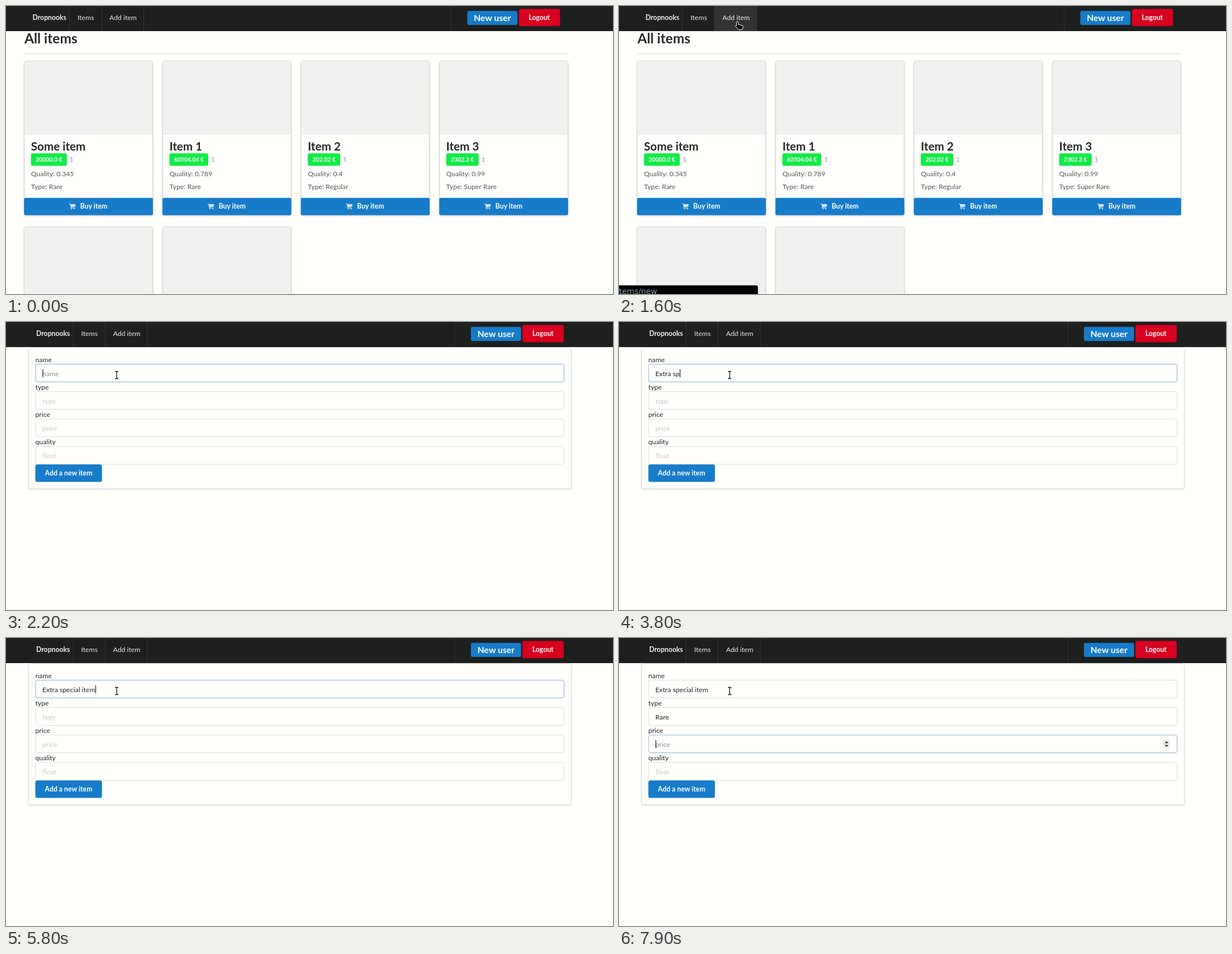
An HTML page that plays this animation: 1086 by 516 pixels, repeating every 8 s.

```html
<!DOCTYPE html>
<html lang="en">
<head>
<meta charset="utf-8">
<title>Item shop</title>
<style>
  html, body { margin: 0; width: 100%; height: 100%; overflow: hidden; background: #fffffc; }
  svg { display: block; width: 1086px; height: 516px; }
  text { font: 12.25px Lato, sans-serif; fill: #272727; white-space: pre; }
  .b { font-weight: 700; }
  .w { fill: #fff; }
  .nav { fill: #eceded; }
  .dim { fill: #555; }
  .card { filter: drop-shadow(0 1px 1.5px rgba(0, 0, 0, .2)); }
  .cursor { fill: #000; stroke: #fff; stroke-linejoin: round; }
</style>
</head>
<body>
<svg id="stage" viewBox="0 0 1086 516"></svg>
<script>
const LOOP = 8000, STEP = 100, SHIFT = 6.5;
const BLUE = '#167bc9', LINE = '#dcddda', FOCUS = '#85b1d6';
const ROW = 49.2, COL = 247.6;

const rect = (x, y, w, h, fill, r = 0, more = '') =>
  `<rect x="${x}" y="${y}" width="${w}" height="${h}" rx="${r}" fill="${fill}" ${more}/>`;
const text = (x, y, s, cls = '', more = '') =>
  `<text x="${x}" y="${y}" class="${cls}" ${more}>${s}</text>`;
const size = px => `style="font-size:${px}px"`;
const middle = 'text-anchor="middle"';

function navBar() {
  const split = x => rect(x, 0, 1, 44.5, '#343535');
  return rect(0, 0, 1086, 45, '#1e1f1f') +
    '<g id="nav">' +
    rect(171, 0, 75.5, 44.5, '#fff', 0, 'id="hover"') +
    [113, 170.5, 246, 796].map(split).join('') +
    text(47.5, 25, 'Dropnooks', 'b nav') +
    text(128, 25, 'Items', 'nav') +
    text(185, 25, 'Add item', 'nav') +
    rect(825.3, 8.7, 89.8, 25.3, BLUE, 3) +
    text(870.2, 26.5, 'New user', 'b w', `text-anchor="middle" style="font-size:15.75px"`) +
    rect(917.5, 5.3, 73.8, 31, '#d8001f', 3.5) +
    text(954.2, 25, 'Logout', 'b w', middle) + '</g>';
}

function cart(x, y) {
  return `<g transform="translate(${x} ${y})" fill="#d5e5f3">` +
    '<path d="M0 0h2.4l.5 1.4h8.6v4.4l-7.4 1 .2.8h6.2v1.1H3.2L1.7 1.1H0z"/>' +
    '<circle cx="4.2" cy="9.8" r="1"/><circle cx="9.7" cy="9.8" r="1"/></g>';
}

function card(i, y, item) {
  const frame = rect(.5, 0, 229.6, 276, '#fffffc', 3.5, 'stroke="#d2d3d0" class="card"') +
    `<path d="M1 130.5V4q0-3.5 3.5-3.5h221.6q3.5 0 3.5 3.5v126.5z" fill="#f0f1ee"/>` +
    rect(1, 130.3, 228.6, 1, '#e4e5e2');
  let body = '';
  if (item) {
    const [name, price, tag, quality, type] = item;
    body = text(12.5, 160, name, 'b', size(20.6)) +
      rect(12.5, 165.3, tag, 22.2, '#10ec45', 3) +
      text(12.5 + tag / 2, 180, price + ' €', 'b w', `text-anchor="middle" style="font-size:10.5px"`) +
      text(12.5 + tag + 5, 180, '1', '', 'style="fill:#999"') +
      text(12.5, 206.5, 'Quality: ' + quality, 'dim') +
      text(12.5, 229, 'Type: ' + type, 'dim') +
      rect(0, 245, 230.6, 31, BLUE, 3) +
      cart(80.5, 255) + text(100.5, 264.3, 'Buy item', 'b w');
  }
  return `<g transform="translate(${32.3 + COL * i} ${y})">${frame}${body}</g>`;
}

function listPage() {
  const items = [
    ['Some item', '20000.0', 64, '0.345', 'Rare'],
    ['Item 1', '60504.04', 69.5, '0.789', 'Rare'],
    ['Item 2', '202.02', 58, '0.4', 'Regular'],
    ['Item 3', '2302.3', 58, '0.99', 'Super Rare']
  ];
  return '<g id="list">' + text(33, 67, 'All items', 'b', size(24.5)) +
    rect(33, 85, 972, 1.3, '#e0e1de') +
    items.map((item, i) => card(i, 98.7, item)).join('') +
    card(0, 395.7) + card(1, 395.7) + '</g>';
}

function field(label, hint, i) {
  const y = 75.5 + ROW * i;
  return text(52.5, y - 3.8, label) +
    rect(53, y, 945.5, 31.8, '#fffffc', 3.5, `id="box${i}"`) +
    text(65, y + 21, hint, '', `id="hint${i}"`) +
    text(65, y + 21, '', '', `id="value${i}" style="fill:#222"`);
}

function formPage() {
  const fields = [['name', 'name'], ['type', 'type'], ['price', 'price'], ['quality', 'float']];
  return '<g id="form">' +
    rect(40.3, 46.3, 971, 252.5, '#fffffc', 3.5, `stroke="${LINE}" style="filter:drop-shadow(0 1px 1px rgba(0,0,0,.15))"`) +
    fields.map(([label, hint], i) => field(label, hint, i)).join('') +
    rect(52.5, 255.3, 119.2, 31.2, BLUE, 3.5) +
    text(112, 275.2, 'Add a new item', 'b w', middle) +
    '<g id="spin">' + rect(973, 182.5, 13, 15, '#efefed') +
    '<path d="M976 188.5l3.5-4 3.5 4zM976 191.5l3.5 4 3.5-4z" fill="#444"/></g>' +
    rect(65.4, 0, 1.1, 14.4, '#111', 0, 'id="caret"') + '</g>';
}

function overlays() {
  return '<g id="status"><path d="M0 500.5h245.5q3 0 3 3V516H0z" fill="#000"/>' +
    text(0, 515.6, 'tems/new', '', `style="font:13.9px 'DejaVu Sans',sans-serif;fill:#8297a0"`) + '</g>' +
    '<path id="arrow" class="cursor" d="M0 0v14l3.2-3 2.4 5.6 2.4-1-2.4-5.4h4.4z"/>' +
    '<path id="hand" class="cursor" d="M-1.6 1.4q0-1.6 1.5-1.6t1.5 1.6v4l6.6 1.2q2 .4 2 2.2l-.5 3.4-1 2.2H1.8L-3.6 8.6q-.6-1.5.9-1.7l1.1.5z"/>' +
    '<g id="beam" fill="none"><path id="stem" d="M-3-6.5h2L0-5.5l1-1h2M0-5.5v11M-3 6.5h2l1-1 1 1h2" stroke="#fff" stroke-width="2.6"/>' +
    '<path d="M-3-6.5h2L0-5.5l1-1h2M0-5.5v11M-3 6.5h2l1-1 1 1h2" stroke="#111" stroke-width="1.3"/></g>';
}

const stage = document.getElementById('stage');
stage.innerHTML = listPage() + formPage() + navBar() + overlays();
const el = id => document.getElementById(id);
const show = (id, on) => { el(id).style.display = on ? '' : 'none'; };
const clamp = v => Math.max(0, Math.min(1, v));
const mix = (a, b, k) => a + (b - a) * k;

const nameTyping = [
  [2600, 'E'], [2800, 'Ex'], [3100, 'Ext'], [3300, 'Extr'], [3400, 'Extra'],
  [3700, 'Extra s'], [3800, 'Extra sp'], [4200, 'Extra spce'],
  [4600, 'Extra spc'], [4700, 'Extra sp'], [4900, 'Extra spe'],
  [5000, 'Extra spec'], [5100, 'Extra speci'], [5200, 'Extra special'],
  [5500, 'Extra special i'], [5600, 'Extra special it'], [5800, 'Extra special item']
];
const typeTyping = [[6700, 'R'], [7500, 'Ra'], [7600, 'Rare']];

const typed = (keys, t) => keys.reduce((s, [at, value]) => t >= at ? value : s, '');

function pointer(t) {
  if (t < 400) return null;
  if (t < 1700) {
    const k = 1 - (1 - clamp((t - 350) / 850)) ** 2;
    return [mix(253, 212, k), mix(516, 28, k)];
  }
  const k = clamp((t - 1700) / 500);
  const ease = k * (2 - k);
  return [mix(208, 198, ease), mix(45, 95, ease)];
}

function drawPointer(t) {
  const p = pointer(t);
  let kind = '';
  if (p) {
    if (t < 1700) kind = p[1] < 45 ? 'hand' : 'arrow';
    else kind = p[1] > 75 ? 'beam' : 'arrow';
  }
  for (const id of ['arrow', 'hand', 'beam']) show(id, id === kind);
  if (kind) el(kind).setAttribute('transform', `translate(${p[0]} ${p[1]})`);
  return kind;
}

function drawForm(t) {
  const active = t < 2200 ? -1 : t < 6000 ? 0 : t < 7800 ? 1 : 2;
  const fading = (t >= 6000 && t < 6500) || (t >= 7800 && t < 7900);
  const values = [typed(nameTyping, t), typed(typeTyping, t), '', ''];
  values.forEach((value, i) => {
    const on = i === active;
    el('box' + i).setAttribute('stroke', !on ? LINE : fading ? '#b2c8d9' : FOCUS);
    el('hint' + i).style.fill = !on ? '#c7c8c5' : fading ? '#a8a8a6' : '#888';
    show('hint' + i, !value);
    el('value' + i).textContent = value;
  });
  show('spin', active === 2);
  const blink = (t >= 6500 && t < 6700) || (t >= 7300 && t < 7500);
  show('caret', active >= 0 && !blink);
  if (active >= 0) {
    const width = values[active] ? el('value' + active).getComputedTextLength() : 0;
    el('caret').setAttribute('x', 65.4 + width);
    el('caret').setAttribute('y', 84.6 + ROW * active);
  }
}

function draw(time) {
  const t = Math.floor(time / STEP) * STEP;
  const form = t >= 1700;
  show('list', !form);
  show('form', form);
  el('nav').setAttribute('transform', `translate(${form ? SHIFT : 0} 0)`);
  const kind = drawPointer(t);
  el('hover').setAttribute('opacity', kind === 'hand' ? .085 : t === 1700 ? .035 : 0);
  const fade = t < 1200 ? 0 : t < 1300 ? .6 : t < 1700 ? 1 : clamp(.8 - (t - 1700) / 250);
  el('status').setAttribute('opacity', fade);
  if (form) drawForm(t);
}

function tick() {
  draw(performance.now() % LOOP);
  requestAnimationFrame(tick);
}
tick();
</script>
</body>
</html>
```
